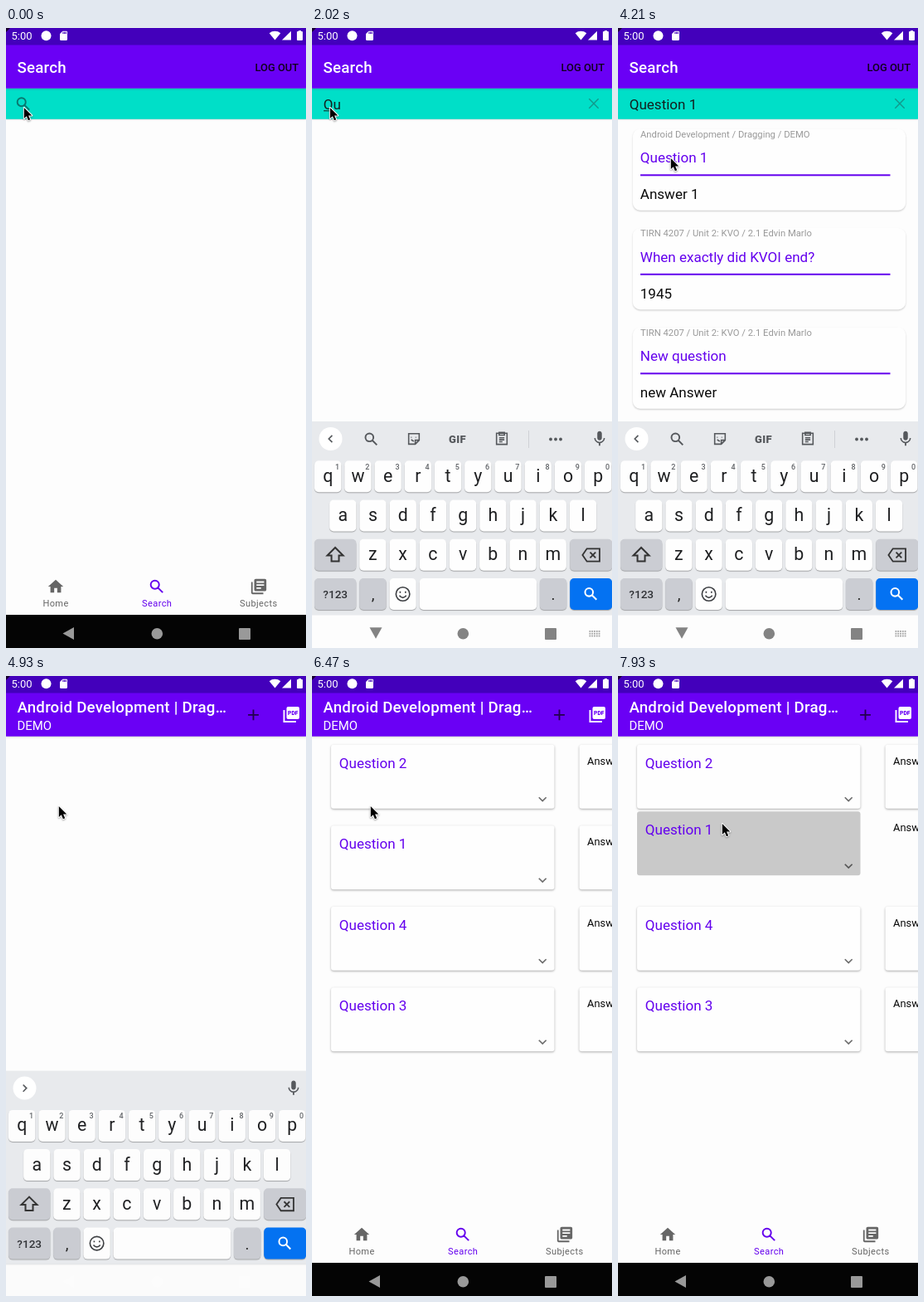
An HTML page with a canvas that plays this animation: 362 by 747 pixels, repeating every 7.99 s.

```html
<!DOCTYPE html>
<html lang="en">
<head>
<meta charset="utf-8">
<title>Search and reorder</title>
<style>
html, body { margin: 0; width: 100%; height: 100%; overflow: hidden; background: #fdfdfd; }
canvas { display: block; width: 362px; height: 747px; }
</style>
</head>
<body>
<canvas id="stage"></canvas>
<script>
const W = 362, H = 747, LOOP = 7990;
const PURPLE = '#6a00f5', INK = '#6400ee', TEAL = '#00dfc8', PAGE = '#fdfdfd', GREY = '#666';
const stage = document.getElementById('stage');
const dpr = window.devicePixelRatio || 1;
stage.width = W * dpr;
stage.height = H * dpr;
const c = stage.getContext('2d');

const ICON = {
  home: 'M10 20v-6h4v6h5v-8h3L12 3 2 12h3v8z',
  books: 'M4 6H2v14c0 1.1.9 2 2 2h14v-2H4V6zm16-4H8c-1.1 0-2 .9-2 2v12c0 1.1.9 2 2 2h12c1.1 0 2-.9 2-2V4c0-1.1-.9-2-2-2zm-1 9H9V9h10v2zm-4 4H9v-2h6v2zm4-8H9V5h10v2z',
  card: 'M18 2h-8L4 8v12c0 1.1.9 2 2 2h12c1.1 0 2-.9 2-2V4c0-1.1-.9-2-2-2zm-6 6h-2V4h2v4zm3 0h-2V4h2v4zm3 0h-2V4h2v4z',
  mic: 'M12 14c1.66 0 3-1.34 3-3V5c0-1.66-1.34-3-3-3S9 3.34 9 5v6c0 1.66 1.34 3 3 3zm5.3-3c0 3-2.54 5.1-5.3 5.1S6.7 14 6.7 11H5c0 3.41 2.72 6.23 6 6.72V21h2v-3.28c3.28-.48 6-3.3 6-6.72h-1.7z'
};
const LINE = {
  search: 'M15 9.5a5.5 5.5 0 1 1-11 0a5.5 5.5 0 0 1 11 0zM13.7 13.7L19.8 19.8',
  close: 'M5.5 5.5L18.5 18.5M18.5 5.5L5.5 18.5',
  left: 'M14.5 6.5L9 12L14.5 17.5',
  right: 'M9.5 6.5L15 12L9.5 17.5',
  down: 'M6.7 9.3L12 14.6L17.3 9.3',
  plus: 'M12 5V19M5 12H19',
  shift: 'M12 3L2.5 12.5H7.5V19.5H16.5V12.5H21.5z',
  erase: 'M7 4H23V20H7L1.5 12zM11 8.5L18 15.5M18 8.5L11 15.5',
  sticker: 'M4 4H20V14L14 20H4zM14 20V14H20M8 9V10M15 9V10M8 13Q10 16 12 15',
  clip: 'M4 4H20V21H4zM8 3H16V7H8zM8 11H16M8 14H16M8 17H13',
  face: 'M21 12a9 9 0 1 1-18 0a9 9 0 0 1 18 0zM8.5 8.5V10.5M15.5 8.5V10.5M7.5 14Q12 19.5 16.5 14'
};

function at(x, y, size, draw) {
  c.save();
  c.translate(x - size / 2, y - size / 2);
  c.scale(size / 24, size / 24);
  draw();
  c.restore();
}
function icon(name, x, y, size, color) {
  at(x, y, size, () => { c.fillStyle = color; c.fill(new Path2D(ICON[name])); });
}
function line(name, x, y, size, color, width = 2) {
  at(x, y, size, () => {
    c.strokeStyle = color;
    c.lineWidth = width;
    c.stroke(new Path2D(LINE[name]));
  });
}
function text(s, x, y, size, color, { weight = 400, align = 'left', gap = 0 } = {}) {
  c.font = `${weight} ${size}px Roboto, sans-serif`;
  c.letterSpacing = gap + 'px';
  c.textAlign = align;
  c.fillStyle = color;
  c.fillText(s, x, y);
}
function rect(x, y, w, h, color) {
  c.fillStyle = color;
  c.fillRect(x, y, w, h);
}
function round(x, y, w, h, r, color, shade = 0, blur = 0, drop = 1) {
  c.save();
  if (shade) {
    c.shadowColor = `rgba(0,0,0,${shade})`;
    c.shadowBlur = blur * dpr;
    c.shadowOffsetY = drop * dpr;
  }
  c.fillStyle = color;
  c.beginPath();
  c.roundRect(x, y, w, h, r);
  c.fill();
  c.restore();
}
function disc(x, y, r, color) {
  c.fillStyle = color;
  c.beginPath();
  c.arc(x, y, r, 0, 7);
  c.fill();
}
function poly(points, color) {
  c.fillStyle = color;
  c.beginPath();
  points.forEach(([x, y]) => c.lineTo(x, y));
  c.closePath();
  c.fill();
}
const clamp = v => Math.max(0, Math.min(1, v));
const span = (t, a, b) => clamp((t - a) / (b - a));
const last = (list, t) => list.reduce((hit, row) => row[0] <= t ? row[1] : hit, '');

// Timeline
const SHOW = 1190, TYPE = 1780, RESULTS = 2320, FOUND = 3380, OPEN = 4930, LIST = 5270, GRAB = 7470;
const TYPED = [[TYPE, 'Q'], [2020, 'Qu'], [2200, 'Que'], [2320, 'Ques'], [2440, 'Quest'],
  [2680, 'Questi'], [2800, 'Questio'], [2860, 'Question'], [2970, 'Question '], [3080, 'Question 1']];
const PATH = [[0, 21, 95], [3560, 21, 95], [4150, 62, 155], [4210, 63, 156], [6410, 63, 156],
  [6470, 70, 156], [6900, 113, 205], [7170, 113, 194], [7520, 113, 194], [7930, 125, 177], [LOOP, 125, 177]];

function pointer(t) {
  const i = Math.max(1, PATH.findIndex(p => p[0] > t));
  const [a, b] = [PATH[i - 1], PATH[i]];
  const k = span(t, a[0], b[0]), e = k * k * (3 - 2 * k);
  return [a[1] + (b[1] - a[1]) * e, a[2] + (b[2] - a[2]) * e];
}

function statusBar() {
  rect(0, 0, W, 20.5, '#4300bb');
  poly([[0, 0], [5, 0], [0, 5]], '#180030');
  text('5:00', 6.5, 14, 13, '#fff');
  disc(48.5, 9.3, 6, '#fff');
  icon('card', 69.5, 9.3, 13.5, '#fff');
  c.fillStyle = '#fff';
  c.beginPath();
  c.moveTo(324.5, 14.5);
  c.arc(324.5, 14.5, 10.7, -Math.PI * .72, -Math.PI * .28);
  c.fill();
  poly([[333, 14.5], [344, 14.5], [344, 3.7]], '#fff');
  round(351, 4, 7, 11, 1, '#fff');
  rect(353, 3, 3, 2, '#fff');
}

function appBar(detail) {
  round(0, 20, W, 52.8, 0, PURPLE, .14, 2);
  const title = { weight: 500, gap: .23 };
  if (!detail) {
    text('Search', 13.5, 54, 18.7, '#fff', title);
    text('LOG OUT', 300.5, 52, 12.9, '#10001c', { weight: 500 });
    return;
  }
  text('Android Development | Drag…', 13.5, 44, 18.7, '#fff', title);
  text('DEMO', 13.5, 65.3, 14.9, '#fff');
  line('plus', 298.5, 46.8, 22, '#22004c');
  round(338.5, 37, 15.5, 15, 2, '#fff');
  c.strokeStyle = '#fff';
  c.lineWidth = 1.9;
  c.beginPath();
  c.moveTo(335.5, 41);
  c.lineTo(335.5, 55);
  c.lineTo(350, 55);
  c.stroke();
  text('PDF', 346.3, 47.2, 6.8, PURPLE, { weight: 800, align: 'center' });
}

function tabs() {
  rect(0, 655, W, 52, PAGE);
  icon('home', 60, 673, 22, GREY);
  line('search', 182, 673, 22, INK, 2.1);
  icon('books', 305, 673, 22, GREY);
  [['Home', 60, GREY], ['Search', 182.2, INK], ['Subjects', 304.8, GREY]].forEach(([s, x, color]) =>
    text(s, x, 697.3, 11.06, color, { align: 'center', gap: .37 }));
}

function navIcons(k) {
  const g = Math.round(153 - 22 * k), color = `rgb(${g},${g},${g})`;
  c.save();
  c.translate(75.5 + 1.5 * k, 729.5 - .7 * k);
  c.rotate(-Math.PI / 2 * k);
  poly([[-7, 0], [6.5, -7.5], [6.5, 7.5]], color);
  c.restore();
  disc(182.3, 729.7, 6.8, color);
  round(281, 723, 14, 14, 1, color);
  c.globalAlpha = k;
  for (let i = 0; i < 15; i++) rect(334.5 + i % 5 * 2.8, 726 + Math.floor(i / 5) * 2.8, 1.8, 1.8, '#a4a4a4');
  c.globalAlpha = 1;
}

function searchBar(t) {
  round(0, 72.5, W, 37.3, 0, TEAL, .2, 1.5);
  if (t < SHOW) {
    line('search', 21, 91.5, 22, '#08786f', 2.1);
    return;
  }
  line('close', 340, 91, 21, '#12988b', 1.6);
  if (t < TYPE) {
    c.globalAlpha = .55 + .45 * span(t, SHOW, 1420);
    line('search', 28.5, 93, 21, '#0a9488', 2);
    text('Search questions…', 43, 98.8, 17.05, '#0b8b80');
    c.globalAlpha = 1;
    return;
  }
  const lagged = last(TYPED, t - 58);
  text(last(TYPED, t), 13.7, 97.6, 17.05, '#12201f');
  if (lagged && !lagged.includes(' ')) rect(14, 99.3, c.measureText(lagged).width, 1, '#12201f');
}

const UNIT = 'TIRN 4207 / Unit 2: KVO / 2.1 Edvin Marlo';
const FRESH = [UNIT, 'New question', 'new Answer'];
const FIRST = [FRESH, ['', 'Question 2', 'Answer 2'], ['', 'Question 1', 'Answer 1']];
const FINAL = [['Android Development / Dragging / DEMO', 'Question 1', 'Answer 1'],
  [UNIT, 'When exactly did KVOI end?', '1945'], FRESH];

function results(t) {
  if (t < RESULTS) return;
  (t < FOUND ? FIRST : FINAL).forEach(([label, question, answer], i) => {
    const y = 119.5 * i;
    round(17.8, 121.5 + y, 329.4, 98.2, 9, '#fefefe', .18, 2, 1.2);
    if (t >= 2500) text(label, 27, 131.5 + y, 11.25, '#999');
    text(question, 26.8, 162 + y, 17.05, INK);
    rect(27, 176.3 + y, 301.5, 2, INK);
    text(answer, 26.8, 206 + y, 17.05, '#0a0a0a');
  });
}

function key(x, y, w, color) {
  round(x, y, w, 38, 5, color, .3, 1, 1);
}
function toolbar() {
  const dark = '#55585c';
  line('left', 22.5, 495, 18, dark, 2.2);
  line('search', 71.5, 495.5, 21, dark, 2.2);
  line('sticker', 123, 495, 19, dark, 2);
  text('GIF', 175.5, 499.7, 13, dark, { weight: 800, align: 'center', gap: .4 });
  line('clip', 229, 494.5, 19, dark, 2);
  rect(261, 485, 1, 21, '#cfd1d5');
  [-6, 0, 6].forEach(d => disc(294 + d, 495.5, 1.9, dark));
}
function suggestions(word) {
  line('right', 22.5, 495, 18, '#55585c', 2.2);
  if (!word) return;
  const words = word.startsWith('Question') ? ['Questions', 'Question', 'Questioned'] : [word, 'Question', 'Questions'];
  words.forEach((s, i) => text(s, 81 + 100.4 * i, 501.5, 16.9, '#4a4d51', { align: 'center' }));
  rect(128, 484, 1, 22, '#cfd1d5');
  rect(235, 484, 1, 22, '#cfd1d5');
}

function keyboard(t, drop) {
  const WHITE = '#fefefe', DIM = '#cbcdd3', pitch = 36.22;
  c.save();
  c.translate(0, drop);
  rect(0, 474, W, 234, '#e8eaed');
  rect(0, 707.5, W, 40, '#fdfdfd');
  disc(22.5, 495, 14, '#fff');
  if (t >= OPEN) suggestions('');
  else if (t >= 2080 && t < FOUND) suggestions(last(TYPED, t - 58).trim());
  else toolbar();
  icon('mic', 347, 495, 22, '#55585c');

  const row = (letters, x0, y, tops) => [...letters].forEach((s, i) => {
    const x = x0 + i * pitch;
    key(x - 16.2, y, 32.4, WHITE);
    text(s, x, y + 25.6, 21.3, '#1e1f21', { align: 'center' });
    if (tops) text((i + 1) % 10, x + 11.3, y + 10.2, 9, '#606367', { weight: 500, align: 'center' });
  });
  row('qwertyuiop', 19.2, 521.3, true);
  row('asdfghjkl', 37.3, 568.5);
  row('zxcvbnm', 73.4, 615.7);
  key(3, 615.7, 50.3, DIM);
  line('shift', 28, 635, 24, '#333', 2);
  key(311.2, 615.7, 51, DIM);
  line('erase', 336.5, 635, 23, '#333', 1.9);

  key(3, 663, 50.3, DIM);
  text('?123', 28.2, 687, 13.6, '#303236', { weight: 500, align: 'center' });
  key(57.2, 663, 32.4, DIM);
  text(',', 73.6, 689, 19, '#222', { align: 'center' });
  key(93.4, 663, 32.4, WHITE);
  line('face', 109.6, 682, 22, '#3c3e42', 1.8);
  key(129.6, 663, 141.6, WHITE);
  key(274.9, 663, 32.4, DIM);
  text('.', 291, 689, 19, '#222', { align: 'center' });
  key(311.2, 663, 51, '#0472f2');
  line('search', 336.5, 682, 21, '#fff', 2.3);
  c.restore();
}

function deck(t) {
  if (t < LIST) return;
  const grabbed = t >= GRAB;
  const lift = grabbed ? pointer(t)[1] - 194 : 0;
  [2, 1, 4, 3].forEach((n, i) => {
    const held = grabbed && n === 1;
    const y = 82.7 + 97.5 * i + (n === 1 ? lift : 0);
    const shade = held ? 0 : .33;
    round(23, y, 269.5, 77, 3, held ? '#c9c9c9' : '#fefefe', shade, 2.6);
    if (!held) round(322.5, y, 60, 77, 3, '#fefefe', shade, 2.6);
    text('Question ' + n, 32.8, y + 27.8, 17.05, INK);
    line('down', 278.2, y + 65.8, 20, held ? '#555' : '#6c6c6c', 2);
    text('Answer ' + n, 332, y + 24, 12.9, '#0a0a0a');
  });
}

function arrow(t) {
  c.save();
  c.translate(...pointer(t));
  c.beginPath();
  [[.8, 1], [.8, 14], [3.8, 11.3], [5.9, 16.2], [8.2, 15.2], [6.1, 10.5], [10.3, 10.4]].forEach(p => c.lineTo(...p));
  c.closePath();
  c.strokeStyle = '#fff';
  c.lineWidth = 2;
  c.lineJoin = 'round';
  c.shadowColor = 'rgba(0,0,0,.35)';
  c.shadowBlur = 2 * dpr;
  c.shadowOffsetY = dpr;
  c.stroke();
  c.shadowColor = 'transparent';
  c.fillStyle = '#000';
  c.fill();
  c.restore();
}

function render(t) {
  const detail = t >= OPEN;
  c.setTransform(dpr, 0, 0, dpr, 0, 0);
  rect(0, 0, W, H, PAGE);
  if (detail) {
    deck(t);
  } else {
    results(t);
    searchBar(t);
  }
  appBar(detail);
  statusBar();
  tabs();
  rect(0, 707, W, 40, '#040404');
  if (detail) {
    navIcons(0);
    const gone = span(t, OPEN, OPEN + 118);
    if (gone < 1) {
      c.globalAlpha = 1 - gone;
      keyboard(t, 188 * gone);
      c.globalAlpha = 1;
    }
  } else {
    const rise = span(t, 1250, 1580);
    if (rise > 0) keyboard(t, 273 * (1 - rise) ** 3);
    navIcons(span(t, 1330, 1600));
  }
  arrow(t);
}

const start = performance.now();
function tick() {
  render((performance.now() - start) % LOOP);
  requestAnimationFrame(tick);
}
tick();
</script>
</body>
</html>
```
